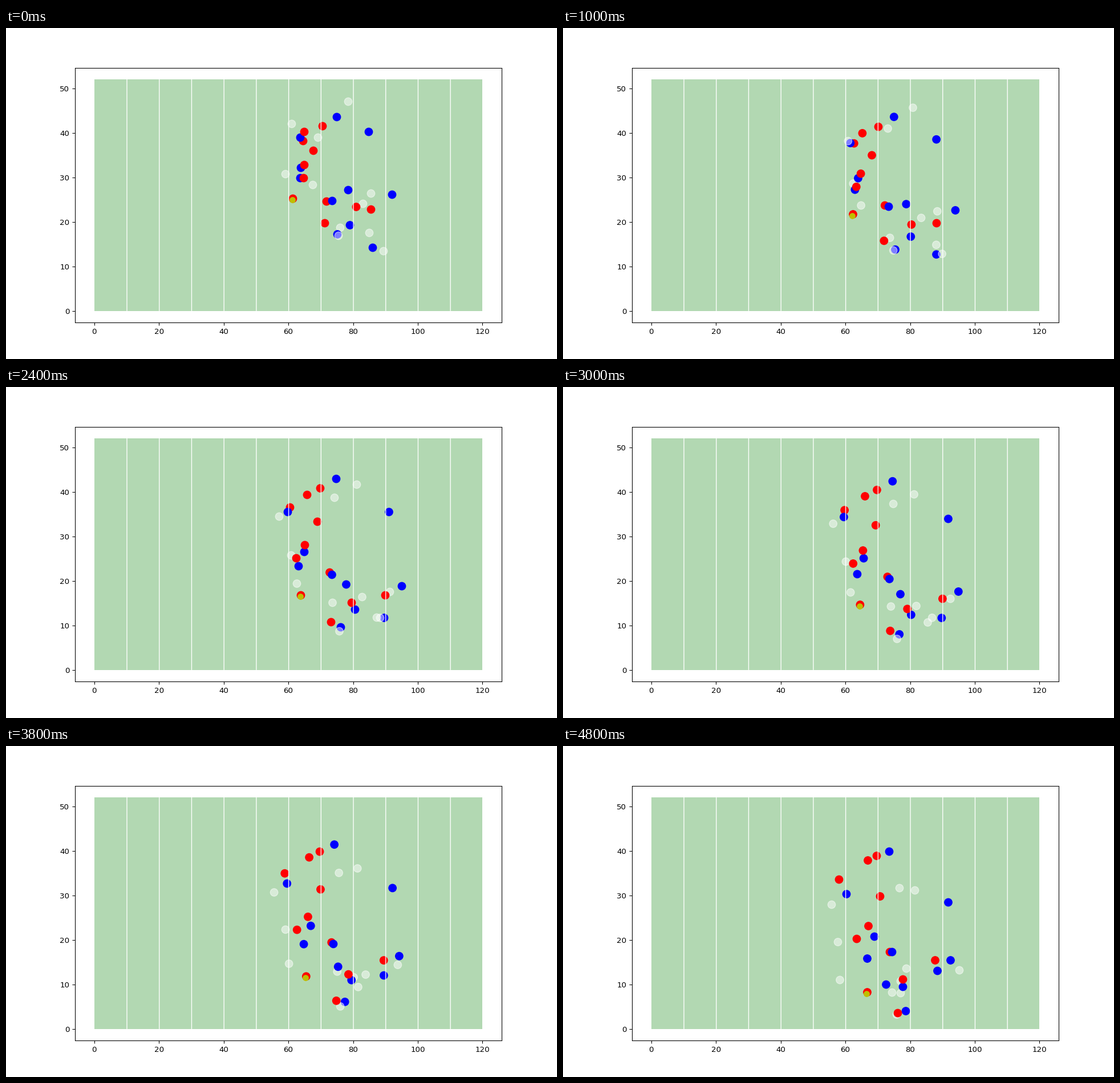
These frames come from a looping animation (966x580 px, 5 s). A matplotlib script:

```python
import numpy as np
import matplotlib.pyplot as plt
from matplotlib.animation import FuncAnimation
from matplotlib.patches import Rectangle

FRAMES, INTERVAL = 25, 200
SETTLED = 3  # frame at which the ghosts have caught up

# Each player bends smoothly through start, middle and end (stage pixels).
OFFENSE = [
    (523, 182, 528, 189, 534.5, 200.5),
    (521, 198, 498, 211, 484, 234),
    (555, 172, 551, 177.5, 550, 192.5),
    (539, 215, 546, 236, 556, 263.5),
    (523, 240, 524, 277, 535.5, 315.5),
    (522, 263, 509, 300, 515, 338),
    (503, 299, 517, 365, 533.5, 431.5),
    (562, 304, 567.5, 325, 573, 361),
    (614, 313.5, 606, 378, 596, 409),
    (640, 318, 665, 365, 652.5, 375.5),
    (559, 342, 570, 412, 587, 468),
]
DEFENSE = [
    (516, 192, 494, 219, 497, 259.5),
    (580, 156, 579, 161, 572, 185),
    (636, 182, 671.5, 219, 675.5, 274),
    (517, 245, 523, 289, 546, 334),
    (516, 263, 513, 314, 533.5, 372.5),
    (572, 303, 571.5, 329, 577, 361),
    (600, 284, 596.5, 346, 566.5, 418),
    (677, 292, 694, 349, 679.5, 375.5),
    (603, 345.5, 612, 390, 596, 422),
    (581, 361.5, 587, 421, 601, 464.5),
    (643, 385, 663, 404.5, 656.5, 394),
]
# Ghosts: where they appear, then start, middle and end of the bend.
GHOSTS = [
    (600, 129, 613, 133, 615, 171, 617, 253),
    (547, 192, 568, 173, 576, 194, 590, 249),
    (501, 168, 508, 190, 479, 227, 471, 278),
    (490, 256, 511, 267, 500, 295, 482, 343.5),
    (538, 275, 526, 302, 510, 344.5, 485.5, 410),
    (640, 290, 651, 308, 673, 359, 695, 393),
    (626, 308, 627, 323, 624.5, 368, 592, 433),
    (586, 350, 575, 366, 572.5, 378, 592, 412),
    (583, 364, 577, 377, 584.5, 428, 585, 470.5),
    (637, 359, 650.5, 372, 650, 404, 577, 432),
    (662, 391, 664, 391, 656, 404.5, 602, 390),
]


def to_field(rows):
    """Pixel rows -> array (player, key, xy) in yards."""
    points = np.reshape(rows, (len(rows), -1, 2))
    return (points - [154.8, 495.9]) / [5.6716, -7.8077]


def bend(keys, first=0):
    """Positions (frame, player, xy) on a parabola through three keys."""
    times = np.array([first, 12, 24])
    fit = np.polyfit(times, keys.transpose(1, 0, 2).reshape(3, -1), 2)
    return (np.vander(np.arange(FRAMES), 3) @ fit).reshape(FRAMES, -1, 2)


def settle(keys):
    """Ease out from the first key, then follow the bend."""
    path = bend(keys[:, 1:], SETTLED)
    for i in range(SETTLED):
        ease = 1 - (1 - i / SETTLED) ** 2
        path[i] = keys[:, 0] + (keys[:, 1] - keys[:, 0]) * ease
    return path


red, blue = bend(to_field(OFFENSE)), bend(to_field(DEFENSE))
ghost = settle(to_field(GHOSTS))
ball = red[:, [6]] + [-0.2, -0.3]  # held by the carrier

fig, ax = plt.subplots(figsize=(10.0001, 6.0042), dpi=96.6)
ax.set(xlim=(-6, 126), ylim=(-2.6, 54.6))
ax.add_patch(Rectangle((0, 0), 120, 52, facecolor="green", edgecolor="none", alpha=0.3))
yard_lines = np.arange(10, 120, 10) + 0.09
ax.vlines(yard_lines, 0, 52, color="white", lw=1, zorder=2.2, snap=False)


def dots(path, players, color, size=10, alpha=None):
    path = path[:, players]
    areas = np.full(len(players), size ** 2)
    return ax.scatter(*path[0].T, s=areas, c=color, lw=1, alpha=alpha, zorder=2), path


back_red, front_red = [1, 7], [0, 2, 3, 4, 5, 6, 8, 9, 10]
low_ghost, high_ghost = [0, 1, 3, 4, 5, 6, 7], [2, 8, 9, 10]
layers = [
    dots(red, back_red, "r"),
    dots(ghost, low_ghost, "w", alpha=0.5),
    dots(blue, range(11), "b"),
    dots(ghost, high_ghost, "w", alpha=0.5),
    dots(red, front_red, "r"),
    dots(ball, [0], "y", size=7),
]


def update(frame):
    for group, path in layers:
        group.set_offsets(path[frame])
    return [group for group, _ in layers]


anim = FuncAnimation(fig, update, frames=FRAMES, interval=INTERVAL, repeat=True, repeat_delay=0)
plt.show()
```
